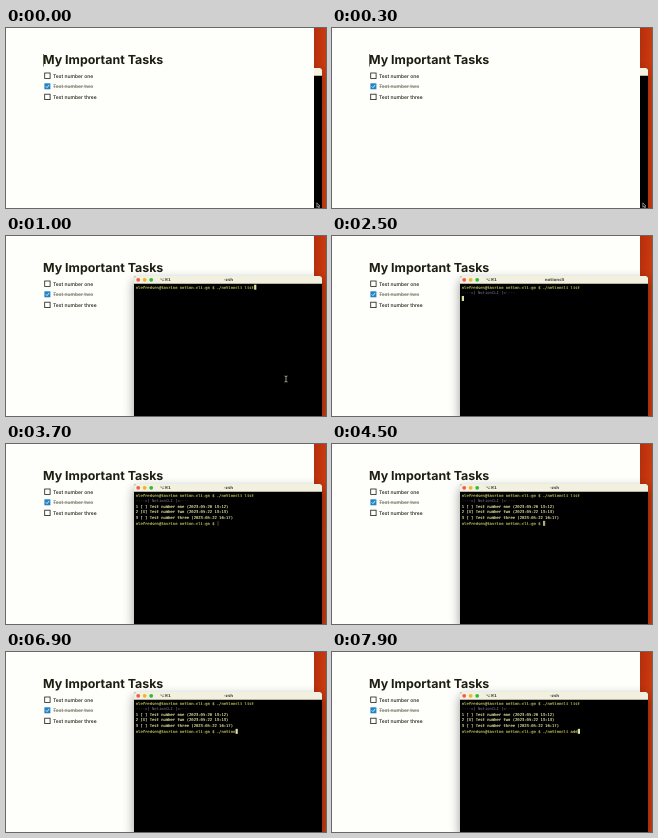
An HTML page for the animation above (8000 ms loop, 320 by 180 pixels).

```html
<!DOCTYPE html>
<html lang="en">
<head>
<meta charset="utf-8">
<title>Task list and terminal</title>
<style>
  html, body { margin: 0; width: 100%; height: 100%; overflow: hidden; background: #fefefa; }
  svg { display: block; width: 100vw; height: 100vh; }
  text { white-space: pre; text-rendering: geometricPrecision; }
  .page { font-family: Inter, "Open Sans", sans-serif; fill: #1e1d12; }
  .title { font-size: 12.42px; font-weight: 700; }
  .item { font-size: 5px; font-weight: 500; }
  .done { fill: #77776a; text-decoration: line-through .35px; }
  .box { fill: #fefefa; stroke: #1e1d12; stroke-width: .8; }
  .term { font: 3.854px "DejaVu Sans Mono", monospace; stroke-width: .12; }
  .prompt { fill: #c2c260; stroke: #c2c260; }
  .task { fill: #ececa8; stroke: #ececa8; }
  .header { fill: #7c7c9c; }
  .bar { font: 700 4px "DejaVu Sans", sans-serif; fill: #4a483e; }
</style>
</head>
<body>
<svg viewBox="0 0 320 180" preserveAspectRatio="none">
  <defs>
    <linearGradient id="wall" x1="0" y1="0" x2="1" y2=".3">
      <stop offset="0" stop-color="#a8260a"/>
      <stop offset="1" stop-color="#cc3c10"/>
    </linearGradient>
    <filter id="blur" x="-20%" y="-20%" width="140%" height="140%">
      <feGaussianBlur stdDeviation="5.5"/>
    </filter>
  </defs>

  <rect x="300" width="20" height="180" fill="url(#wall)"/>
  <g id="back"></g>
  <rect width="308" height="180" fill="#fefefa"/>

  <g class="page">
    <text class="title" x="37" y="36.300">My Important Tasks</text>
    <rect id="caret" x="37" y="26" width=".6" height="12.500"/>
    <g id="items"></g>
  </g>

  <g id="front">
    <g id="win">
      <rect id="shadow" x="128" y="44" width="188" height="142" rx="2" filter="url(#blur)"/>
      <path d="M128 180V42.500Q128 40 130.500 40H313.500Q316 40 316 42.500V180Z"/>
      <path id="head" d="M128 47.700V42.500Q128 40 130.500 40H313.500Q316 40 316 42.500V47.700Z"/>
      <g id="lights"></g>
      <text class="bar" id="tab" x="153.800" y="45.300">⌥⌘1</text>
      <text class="bar" id="name" x="222.500" y="45.300" text-anchor="middle"></text>
      <g class="term" id="lines"></g>
      <rect id="block" width="2.200" height="5" stroke-width=".5"/>
    </g>
  </g>

  <path id="arrow" d="M310.800 174.800V179.300L311.900 178.300L312.700 180L313.500 179.600L312.700 178H314Z"
        fill="#111" stroke="#e4e4d0" stroke-width=".5"/>
  <path id="beam" d="M-1.500 -3Q0 -3 0 -2Q0 -3 1.500 -3M0 -2V2M-1.500 3Q0 3 0 2Q0 3 1.500 3"
        fill="none" stroke="#dcdcc4" stroke-width=".7"/>
</svg>

<script>
const LOOP = 8000;
const LEFT = 129.8, TOP = 52.6, COL = 2.32, ROW = 5.63;
const PROMPT = 'olefredsen@tavrino notion-cli-go $ ';
const HEADER = '----=[ NotionCLI ]=----';
const TASKS = [
  '1 [ ] Test number one (2023-05-20 13:12)',
  '2 [X] Test number two (2023-05-22 13:13)',
  '3 [ ] Test number three (2023-05-22 16:17)'
];
const STYLES = ['prompt', 'header', 'task', 'task', 'task', 'prompt'];
const COLORS = ['#f4584e', '#f0b32c', '#35b83f'];

// Moments in ms
const FRONT = 400, FOCUS = 500, ENTER = 1400, OUTPUT = 3000, TYPE = 6200;
const ADD = './notioncli add';
const BURSTS = [[TYPE, 9], [7300, 6]];

const $ = id => document.getElementById(id);

function make(tag, parent, attrs, text = '') {
  const el = document.createElementNS('http://www.w3.org/2000/svg', tag);
  for (const key in attrs) el.setAttribute(key, attrs[key]);
  el.textContent = text;
  parent.appendChild(el);
  return el;
}

['one', 'two', 'three'].forEach((word, i) => {
  const y = 45 + i * 10.6, done = i === 1, items = $('items');
  if (done) {
    make('rect', items, { x: 38.4, y: y - .3, width: 6, height: 6, fill: '#2384c4' });
    make('path', items, { d: `M39.8 ${y + 2.8}l1.2 1.2l2.2 -2.7`, fill: 'none', stroke: '#fff', 'stroke-width': .8 });
  } else {
    make('rect', items, { class: 'box', x: 38.7, y, width: 5.4, height: 5.4 });
  }
  make('text', items, { class: done ? 'item done' : 'item', x: 47, y: y + 4.6 }, 'Test number ' + word);
});

const lights = COLORS.map((_, i) => make('circle', $('lights'), { cx: 132.2 + i * 6.5, cy: 43.8, r: 1.9 }));
const rows = STYLES.map((style, i) => make('text', $('lines'), { class: style, x: LEFT, y: TOP + i * ROW }));

const show = (el, on) => el.setAttribute('visibility', on ? 'visible' : 'hidden');
const clamp = (v, max = 1) => Math.max(0, Math.min(max, v));

const typedCount = t => BURSTS.reduce((n, [start, max]) =>
  n + clamp(Math.floor((t - start) / 100) + 1, max), 0);

function screenLines(t) {
  const lines = [PROMPT + './notioncli list'];
  if (t >= OUTPUT) lines.push(HEADER, ...TASKS, PROMPT + ADD.slice(0, typedCount(t)));
  else if (t >= ENTER) lines.push(HEADER, '');
  return lines;
}

// Fades out and back once a second, restarting after each event
function blink(t) {
  const from = t >= OUTPUT ? OUTPUT + 300 : ENTER + 500;
  if (t < from || t >= TYPE) return 1;
  const p = clamp((t - from) % 1000 / 700);
  return 1 - Math.sin(Math.PI * p) ** 6;
}

function draw(t) {
  const raised = t >= FRONT, focused = t >= FOCUS;
  const home = raised ? $('front') : $('back');
  if ($('win').parentNode !== home) home.appendChild($('win'));
  show($('caret'), !raised);
  show($('arrow'), !raised);

  $('shadow').setAttribute('opacity', focused ? .4 : .25);
  $('head').setAttribute('fill', focused ? '#f2f0de' : '#f5f3e0');
  lights.forEach((el, i) => el.setAttribute('fill', focused ? COLORS[i] : '#dedcd0'));
  for (const id of ['tab', 'name']) $(id).setAttribute('opacity', focused ? 1 : .5);
  $('name').textContent = t >= ENTER && t < OUTPUT ? 'notioncli' : '-zsh';

  const lines = screenLines(t);
  rows.forEach((el, i) => { el.textContent = lines[i] || ''; });

  const last = lines.length - 1, block = $('block');
  block.setAttribute('x', LEFT + lines[last].length * COL);
  block.setAttribute('y', TOP + last * ROW - 3.9);
  block.setAttribute('fill', focused ? '#e0e0a4' : 'none');
  block.setAttribute('stroke', focused ? 'none' : '#c8c8a0');
  block.setAttribute('opacity', blink(t));

  const p = clamp((t - FRONT) / 600), e = p * p * (3 - 2 * p);
  show($('beam'), raised && t < ENTER);
  $('beam').setAttribute('transform', `translate(${311 - 31 * e} ${176 - 33 * e})`);
}

const start = performance.now();
function tick(now) {
  draw(Math.max(0, now - start) % LOOP);
  requestAnimationFrame(tick);
}
draw(0);
requestAnimationFrame(tick);
</script>
</body>
</html>
```
